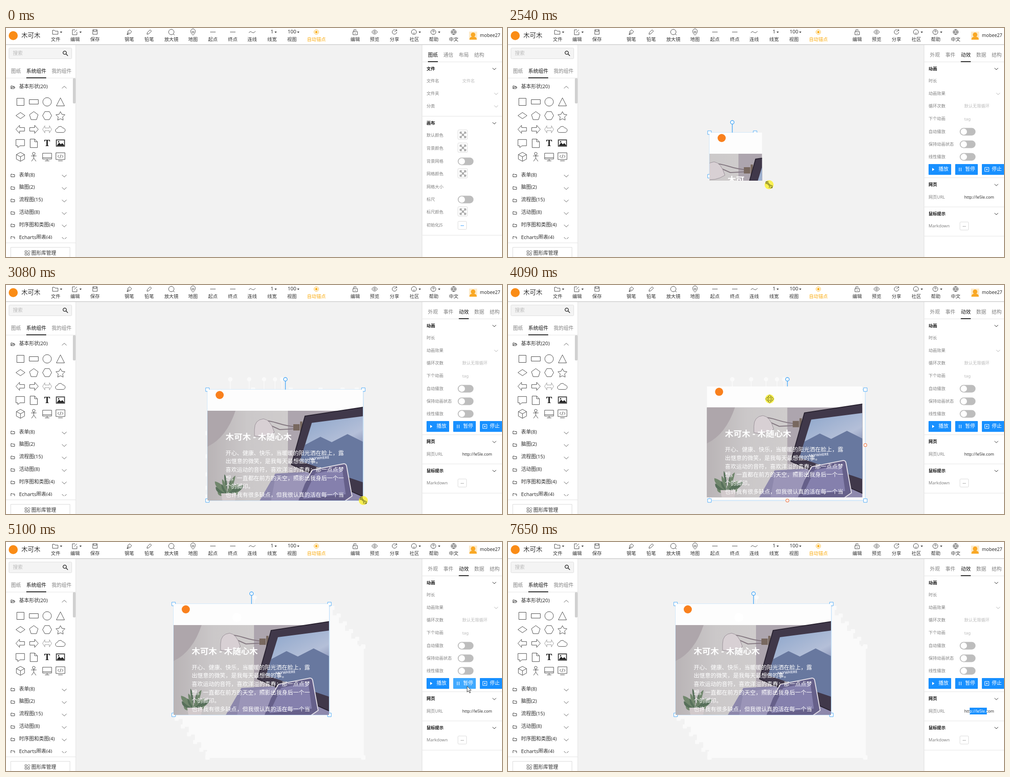
An HTML page with a canvas that plays this animation: 1098x510 px, repeating every 9460 ms.

```html
<!DOCTYPE html>
<html lang="zh-CN">
<head>
<meta charset="utf-8">
<style>
html, body { margin: 0; width: 100%; height: 100%; overflow: hidden; background: #fff; }
canvas { display: block; }
</style>
</head>
<body>
<canvas id="stage" width="1098" height="510"></canvas>
<script>
const g = document.getElementById('stage').getContext('2d');
const LOOP = 9460, FONT = '"Noto Sans","Noto Sans CJK SC",sans-serif';
const INK = '#303030', GREY = '#808080', PALE = '#bbb', BLUE = '#1890ff', GHOST = '#fafafa';

// Start, end and step count of each burst of motion.
const BURSTS = [[120, 970, 12], [1070, 1990, 13], [2090, 2310, 4], [2460, 3170, 10], [3320, 3860, 8],
  [4030, 4940, 13], [5020, 5800, 11], [6110, 6180, 2], [6480, 7120, 9], [7290, 7650, 5]];
const DROP = 1650, LOADED = 1990, GRAB = 2460, LET_GO = 3170, DRAG = 4030, DRAG_END = 4500;

// Cursor way points: time, x, y.
const PATH = [[120, 817, 486], [500, 330, 272], [970, 117, 284], [1070, 117, 284], [1530, 503, 287],
  [1700, 505, 289], [1990, 516, 304], [2090, 518, 306], [2310, 524, 320], [2460, 548, 331],
  [3170, 790, 480], [3320, 780, 468], [3860, 585, 261], [4030, 585, 261], [4485, 510, 166],
  [4940, 1020, 312], [5020, 1020, 314], [5800, 1023, 381], [6180, 1023, 381], [6480, 1028, 380],
  [7120, 1078, 377], [7290, 1075, 380], [7650, 1060, 512]];

const clamp = v => Math.max(0, Math.min(1, v));
const easeOut = v => 1 - (1 - clamp(v)) ** 2;
const gap = ([a, b, n]) => (b - a) / (n - 1);

function snap(t) {
  const b = BURSTS.filter(b => b[0] <= t).pop();
  if (!b) return 0;
  const i = Math.min(b[2] - 1, Math.floor((t - b[0]) / gap(b) + 1e-6));
  return b[0] + i * gap(b);
}

function along(t) {
  const i = PATH.findIndex(p => p[0] > t);
  if (i < 1) return PATH[i < 0 ? PATH.length - 1 : 0].slice(1);
  const [a, b] = [PATH[i - 1], PATH[i]], k = (t - a[0]) / (b[0] - a[0]);
  return [a[1] + (b[1] - a[1]) * k, a[2] + (b[2] - a[2]) * k];
}

// Box of the widget; the web page inside runs a little ahead of its outline.
function boxAt(t, growLead = 0, moveLead = 0) {
  const e = easeOut((t - 2538.9) / 418 + growLead);
  const m = t < DRAG ? 0 : clamp((t - DRAG) / 417 + moveLead);
  return { x: 446 - 75 * m, y: 233 - 95 * m, w: 101 + 244 * e, h: 97 + 150 * e };
}

function cursorAt(t) {
  if (t > GRAB && t < LET_GO) {
    const b = boxAt(t, .0657);
    return [b.x + b.w, b.y + b.h];
  }
  if (t >= DRAG && t < DRAG_END) {
    const b = boxAt(t, 0, .076);
    return [b.x + 139, b.y + 28];
  }
  return along(t);
}

function rect(x, y, w, h, fill, line, r = 0) {
  g.beginPath();
  g.roundRect(x, y, w, h, r);
  if (fill) { g.fillStyle = fill; g.fill(); }
  if (line) { g.strokeStyle = line; g.lineWidth = 1; g.stroke(); }
}
function dot(x, y, r, fill, line, width = 1) {
  g.beginPath();
  g.arc(x, y, r, 0, 7);
  if (fill) { g.fillStyle = fill; g.fill(); }
  if (line) { g.strokeStyle = line; g.lineWidth = width; g.stroke(); }
}
function icon(d, x, y, line = INK, width = 1, fill) {
  const p = new Path2D(d);
  g.save();
  g.translate(x, y);
  if (fill) { g.fillStyle = fill; g.fill(p); }
  if (line) { g.strokeStyle = line; g.lineWidth = width; g.stroke(p); }
  g.restore();
}
function text(s, x, y, size, color = INK, weight = '', align = 'left', family = FONT) {
  g.font = `${weight} ${size}px ${family}`;
  g.fillStyle = color;
  g.textAlign = align;
  g.textBaseline = 'middle';
  g.fillText(s, x, y);
}
const hline = (x, y, w, color = '#e4e4e4', h = 1) => rect(x, y, w, h, color);
const chevron = (x, y, color, s = 4, up = 1) => icon(`M${-s} ${-s / 2 * up}l${s} ${s * up} ${s} ${-s * up}`, x, y, color);
const ring = r => `M${r} 0a${r} ${r} 0 1 1 ${-2 * r} 0a${r} ${r} 0 1 1 ${2 * r} 0z`;

const FOLDER = 'M-6-4h4l2 2h6v7h-12z', LINE = 'M-6 0h12';
const EDIT = 'M1-5h-6v11h10v-6M-1 1l6-6';
const TOOLS = [
  ['文件', 110, FOLDER, 1], ['编辑', 153, EDIT, 1], ['保存', 197, 'M-5-5h10v10h-10zM-3-5v4h6v-4'],
  ['钢笔', 273, 'M-5 6l2-8 4-3 4 4-3 4zM-5 6l5-6'], ['铅笔', 317, 'M-5 5l1-4 6-6 3 3-6 6z'],
  ['放大镜', 366, ring(6) + 'M4 4l3 3'], ['地图', 414, 'M0 7c-4-4-5-6-5-9a5 5 0 0 1 10 0c0 3-1 5-5 9z' + ring(2)],
  ['起点', 458, LINE], ['终点', 502, LINE], ['连线', 545, 'M-7 2C-3-7 1 8 7-2'],
  ['线宽', 589, '1', 1], ['视图', 633, '100', 1], ['自动锚点', 687, ring(5)],
  ['编辑', 773, 'M-5-1h10v7h-10zM-3-1v-4h5v2M0 2v2'], ['预览', 816, 'M-6 0c3-6 9-6 12 0c-3 6-9 6-12 0z' + ring(2)],
  ['分享', 860, 'M1-5a5 5 0 1 0 4 5M0 0l5-5M2-5h3v3'], ['社区', 904, ring(5.5) + 'M-2 2q2 2 4 0', 1],
  ['帮助', 947, ring(5.5) + 'M-2-1q0-2 2-2t2 2q-2 1-2 2M0 3v1', 1],
  ['中文', 991, ring(5.5) + 'M-5 0h10M0-5q-5 5 0 10M0-5q5 5 0 10']];

const SHAPES = [
  'M-8-8h16v16h-16z', 'M-10-5h20v10h-20z', ring(9.5), 'M0-9l9 18h-18z',
  'M-10 0l10-7 10 7-10 7z', 'M0-9l9.5 7-3.5 11h-12l-3.5-11z', 'M-5-9h10l5 9-5 9h-10l-5-9z',
  'M0-9l3 6 7 1-5 5 1 7-6-3-6 3 1-7-5-5 7-1z',
  'M-10 0l8-9v5h11v8h-11v5z', 'M10 0l-8-9v5h-11v8h11v5z', 'M-5-8l-5 8 5 8v-5h10v5l5-8-5-8v5h-10z',
  'M-6 7a4.5 4.5 0 0 1-1-9a6.5 6.5 0 0 1 12-1a5 5 0 0 1 1 10z',
  'M-10-8h19v14h-10l-5 4v-4h-4z', 'M-8-9h10l6 6v13h-16zM2-9v6h6', '', 'M-9-7h18v14h-18z',
  'M0-10l9 5v10l-9 5-9-5v-10zM-9-5l9 5 9-5M0 0v10', 'M3-7a3 3 0 1 1-6 0a3 3 0 1 1 6 0zM-6-2h12M0-4v7l-5 7M0 3l5 7',
  'M-10-8h20v13h-20zM-10 2h20M0 5v4M-5 9h10', 'M-10-9h20v15h-20zM-5 9h10M-3-4l-3 3 3 3M3-4l3 3-3 3M1-5l-2 8'];
const GROUPS = ['表单(8)', '脑图(2)', '流程图(15)', '活动图(8)', '时序图和类图(4)', 'Echarts图表(4)'];

function toolbar() {
  rect(0, 0, 1098, 37, '#fff');
  hline(0, 36, 1098, '#d8d8d8', 2);
  dot(16, 17, 10, '#fa8c16');
  text('木可木', 34, 17, 14);
  for (const [label, x, d, caret] of TOOLS) {
    const hot = label === '自动锚点', color = hot ? '#faad14' : INK;
    text(label, x, 26.5, 10.4, color, '', 'center');
    if (/^\d/.test(d)) text(d, x, 9, 11, INK, '', 'center');
    else icon(d, x - (caret ? 1 : 0), 9, color, .9);
    if (hot) dot(x, 9, 2.6, color);
    if (caret) icon('M-2.5-1h5l-2.5 3z', x + (d === '100' ? 14 : d === '1' ? 8 : 12), 9, null, 0, INK);
  }
  rect(1025, 8, 18, 18, '#fdebcb');
  dot(1034, 15, 5, '#f9a825');
  icon('M-8 9q0-7 8-7t8 7z', 1034, 17, null, 0, '#f9a825');
  text('mobee27', 1049, 17, 10.2);
}

function sidebar(hot) {
  rect(0, 38, 154, 472, '#fff');
  rect(154, 38, 1, 472, '#e2e2e2');
  rect(6.5, 44.5, 139, 24, '#f4f4f4', '#dedede', 2);
  text('搜索', 15, 57, 11, PALE);
  icon(ring(3.7) + 'M3 3l4 4', 130, 55, '#111', 1.3);
  text('图纸', 11, 97, 11, GREY);
  text('系统组件', 45, 97, 11, '#111', '500');
  text('我的组件', 101, 97, 11, GREY);
  hline(0, 111, 154);
  hline(45, 110, 44, '#222', 2);
  rect(148, 112, 6, 56, '#d0d0d0', null, 2);
  icon('M-4 3v-6h3l1 1h3v2h-5l-2 3h7l2-3h-2', 15, 132, INK);
  text('基本形状(20)', 29, 131, 11);
  chevron(129, 132, '#555', 5, -1);
  SHAPES.forEach((d, i) => {
    const x = [32, 61.5, 91, 120.5][i % 4], y = 164.5 + 30.6 * (i >> 2);
    if (i === 14) return text('T', x, y + 1, 20, '#222', 'bold', 'center', '"Noto Serif",serif');
    icon(d, x, y, i === 19 && hot ? '#69b1ff' : i === 10 ? '#999' : '#444', i === 15 ? 2 : 1);
    if (i === 15) {
      icon('M-8 6l5-7 4 4 3-3 5 6z', x, y, null, 0, '#222');
      dot(x - 4, y - 3, 1.5, '#222');
    }
  });
  g.save();
  g.beginPath();
  g.rect(0, 310, 148, 160);
  g.clip();
  GROUPS.forEach((s, i) => {
    const y = 327.5 + 27.8 * i;
    icon('M-4-3h3l1 1h4v5h-8z', 15, y + 1, INK);
    text(s, 29, y, 11);
    chevron(129, y + 2, '#555', 5);
  });
  g.restore();
  hline(0, 478, 154);
  rect(10.5, 488.5, 131, 30, '#fff', '#d9d9d9');
  icon('M-5-5h4v4h-4zM-5 1h4v4h-4zM1 1h4v4h-4zM3.5-6l3 3-3 3-3-3z', 47, 501, '#666');
  text('图形库管理', 56, 502, 11);
}

const label = (s, y) => text(s, 931, y, 9.3, GREY);
const hint = (s, y) => text(s, 1010, y, 9.3, PALE);
function heading(s, y) {
  text(s, 931, y, 9.4, '#111', 'bold');
  chevron(1081, y, '#222');
}
function toggle(y) {
  rect(1000, y - 8.5, 35, 17, '#bdbdbd', null, 8.5);
  dot(1009, y, 7, '#fff');
}
function swatch(y) {
  rect(1000.5, y - 10.5, 21, 21, '#fff', '#d9d9d9', 2);
  rect(1004, y - 7, 15, 15, '#b4b4b4', null, 2);
  for (const [x, dy] of [[5, 0], [0, 5], [10, 5], [5, 10]]) rect(1004 + x, y - 7 + dy, 5, 5, '#fff');
  icon('M-6-6l12 12M6-6l-12 12', 1011.5, y + .5, '#aaa', 1.5);
}
function more(y, color) {
  rect(1000.5, y - 9, 19, 18, '#fff', '#d9d9d9', 2);
  for (const i of [-2.5, 0, 2.5]) rect(1009.3 + i, y, 1.5, 1.5, color);
}
function tabs(names, active) {
  rect(921, 38, 177, 472, '#fff');
  rect(920.5, 38, 1, 472, '#dcdcdc');
  hline(922, 75, 176);
  names.forEach((s, i) => {
    const on = i === active, x = 934 + 34.2 * i;
    text(s, x, 60.5, 11, on ? '#111' : GREY, on ? '500' : '');
    if (on) hline(x, 74, 22, '#222', 2);
  });
}

function drawingPanel() {
  tabs(['图纸', '通信', '布局', '结构'], 0);
  heading('文件', 91);
  label('文件名', 118.5);
  hint('文件名', 118.5);
  [['文件夹', 146.5], ['分类', 174.5]].forEach(([s, y]) => { label(s, y); chevron(1085, y, '#aaa'); });
  hline(922, 196, 176);
  heading('画布', 212);
  [['默认颜色', 239, swatch], ['背景颜色', 268, swatch], ['背景网格', 297, toggle], ['网格颜色', 325, swatch],
    ['网格大小', 354], ['标尺', 382, toggle], ['标尺颜色', 410, swatch]].forEach(([s, y, draw]) => {
    label(s, y);
    if (draw) draw(draw === swatch ? y - 1.5 : y);
  });
  label('初始化JS', 439.5);
  more(439.5, BLUE);
  hline(922, 461, 176);
}

function effectPanel(t, [cx, cy]) {
  tabs(['外观', '事件', '动效', '数据', '结构'], 2);
  heading('动画', 91);
  ['时长', '动画效果', '循环次数', '下个动画', '自动播放', '保持动画状态', '线性播放'].forEach((s, i) => {
    const y = 118.5 + 28.1 * i;
    label(s, y);
    if (i === 1) chevron(1085, y, '#aaa');
    if (i > 3) toggle(y);
  });
  hint('默认无限循环', 174.7);
  hint('tag', 203);
  ['播放', '暂停', '停止'].forEach((s, i) => {
    const x = 931 + 59 * i, over = cx >= x && cx < x + 50 && cy >= 303 && cy < 327 && t > DRAG;
    rect(x, 303, 50, 24, over ? '#40a9ff' : BLUE, null, 1);
    if (i === 0) icon('M-2-3.5l5 3.5-5 3.5z', x + 10, 315, null, 0, '#fff');
    if (i === 1) icon('M-2-4v8M2-4v8', x + 11, 315, '#fff', 1.2);
    if (i === 2) icon('M-4.5-4.5h9v9h-9zM-2-2l4 4M2-2l-4 4', x + 11, 315, '#fff');
    text(s, x + 22, 315, 11, '#fff');
  });
  hline(922, 333, 176);
  heading('网页', 349.5);
  label('网页URL', 377);
  if (t >= 5640 && t < 7110) rect(1000.5, 365.5, 110, 21, '#fff', '#40a9ff', 2);
  const url = 'http://le5le.com';
  text(url, 1010, 377, 8.85, INK);
  if (t >= 6480) {
    const end = Math.min(1076, cx);
    g.save();
    g.beginPath();
    g.rect(1022, 369, Math.max(0, end - 1022), 15);
    g.clip();
    rect(1022, 369, 54, 15, BLUE);
    text(url, 1010, 377, 8.85, '#fff');
    g.restore();
  }
  hline(922, 398, 176);
  heading('鼠标提示', 414);
  label('Markdown', 441);
  more(441, '#999');
  hline(922, 463, 176);
}

function photo() {
  rect(-120, 0, 600, 210, '#ada5ae');
  const wall = g.createLinearGradient(0, 0, 178, 0);
  wall.addColorStop(0, '#b9b4b6');
  wall.addColorStop(.5, '#cbc8c9');
  wall.addColorStop(1, '#cfcccc');
  rect(0, 0, 178, 210, wall);
  icon('M0 0h62q-20 60-62 80z', 0, 0, null, 0, '#aea6ab');
  icon('M150 140L345 130V210H110z', 0, 0, null, 0, '#8d88ac');
  icon('M126 22C150 22 160 34 198 36M120 24L160 42 198 40', 0, 0, '#82767f', 2);
  icon('M205 24h5v28h-5z' + 'M190 30h14v14h-14z', 0, 0, null, 0, '#78685f');
  icon('M104 42Q104 20 124 18Q140 20 148 48Q126 62 104 56z', 0, 0, '#988f97', 1, '#d8d0d4');
  icon('M216 12L346-8V192L186 120z', 0, 0, '#292331', 2, '#40384a');
  const sky = g.createLinearGradient(230, 15, 300, 150);
  sky.addColorStop(0, '#90a8cc');
  sky.addColorStop(.5, '#b4bfd8');
  sky.addColorStop(1, '#5a6495');
  icon('M231 27L346 12V160L205 112z', 0, 0, null, 0, sky);
  icon('M216 76L250 58 275 70 310 52 346 70V160L205 112z', 0, 0, null, 0, '#68789f');
  g.save();
  g.translate(247, 106);
  g.rotate(-.08);
  text('ANYWHERE', 0, 0, 8, '#dfe3f0', 'bold', 'center');
  g.restore();
  icon('M232 132L302 118Q307 118 308 124L320 190 300 204H190z', 0, 0, '#e3dfe8', 2, '#66608a');
  icon('M238 140L298 127 306 186 212 196z', 0, 0, null, 0, '#8580ad');
  icon('M150 150L225 138 200 204H140z', 0, 0, null, 0, '#9b95b8');
  for (let i = 0; i < 13; i++) {
    const a = -2.9 + i * .22, r = 24 + 7 * (i % 3);
    const x = 46 + Math.cos(a) * r, y = 186 + Math.sin(a) * r * 1.2;
    icon(`M44 188Q${46 + Math.cos(a) * 9} ${y + 6} ${x} ${y}Q${x - 2} ${y + 16} 48 188z`, 0, 0, null, 0, i % 2 ? '#57705a' : '#71876d');
  }
  icon('M30 184h34l-4 22h-26z', 0, 0, null, 0, '#d2cacc');
}

const TITLE = '木可木 - 木随心木';
const STORY = ['开心、健康、快乐，当暖暖的阳光洒在脸上，露出惬意的微笑，是我每天最想做的事。',
  '喜欢运动的音符，喜欢洋溢的青春；那一点点梦想，一直都在前方的天空，照影出我身后一个一个的脚印。',
  '也许我有很多缺点，但我很认真的活在每一个当下。'];

function wrap(s, x, y, width, size, leading, weight) {
  let row = '';
  for (const c of s) {
    g.font = `${weight} ${size}px ${FONT}`;
    if (row && g.measureText(row + c).width > width) {
      text(row, x, y, size, '#fff', weight);
      row = '';
      y += leading;
    }
    row += c;
  }
  text(row, x, y, size, '#fff', weight);
  return y + leading;
}

function webPage({ x, y, w, h }, loaded) {
  g.save();
  g.beginPath();
  g.rect(x, y, w - 1, h);
  g.clip();
  rect(x, y, w, h, '#fdfdfd');
  if (loaded) {
    dot(x + 27, y + 12, 9, '#f9801d');
    g.save();
    g.translate(x + (w - 345) / 2, y + 47);
    photo();
    g.restore();
    let ty = wrap(TITLE, x + 40, y + 107, w - 79, 18.7, 28, 'bold') + 7;
    for (const s of STORY) ty = wrap(s, x + 40, ty, w - 81, 12.47, 18.7, '');
  }
  g.restore();
}

function outline({ x, y, w, h }, ghost, anchors) {
  const line = ghost ? GHOST : '#46a6f5', fill = ghost ? GHOST : '#fff';
  rect(x, y, w, h, ghost && GHOST, ghost ? GHOST : '#a9d6fb');
  icon('M0 0v-19', x + w / 2, y, line, 1.5);
  dot(x + w / 2, y - 23, 4, fill, line, 1.5);
  for (const cx of [x, x + w]) for (const cy of [y, y + h]) rect(cx - 4, cy - 4, 8, 8, fill, line);
  if (anchors) for (const [ax, ay] of [[0, .5], [1, .5], [.5, 0], [.5, 1]])
    dot(x + w * ax, y + h * ay, 3.3, '#fff', '#ee7f50', 1.3);
}

function trail(t) {
  for (const b of [BURSTS[3], BURSTS[5]])
    for (let i = 0; i < b[2]; i++) {
      const s = b[0] + i * gap(b);
      if (s < t - 1) outline(boxAt(s), true);
    }
}

function pointer(t, [x, y]) {
  const down = t >= GRAB && t < LET_GO || t >= DRAG && t < DRAG_END || t >= 6110 && t < 7110;
  if (down) dot(x, y, 10, 'rgba(250,240,60,.88)');
  if (t >= GRAB && t < 3320) icon('M-7-2v-5h5M7 2v5h-5M-7-7L7 7M-7-2l2-1 6 6-1 4M-2-7l-1 2 6 6 4 1', x, y, '#55551a');
  else if (t >= 3860 && t < DRAG_END)
    icon('M0-9l4 4h-2.5v3.5h3.5v-2.5l4 4-4 4v-2.5h-3.5v3.5h2.5l-4 4-4-4h2.5v-3.5h-3.5v2.5l-4-4 4-4v2.5h3.5v-3.5h-2.5z', x, y, '#66661c');
  else if (t >= 5600 && t < 7110) icon('M-3-7h2.5l.5 1 .5-1h2.5M0-6v12M-3 7h2.5l.5-1 .5 1h2.5', x, y, '#222', 1.3);
  else icon('M.5.5v13l3-3 2.5 5 2-1-2.5-5h4z', x, y, '#333', 1, '#fff');
}

function draw(now) {
  const t = snap(now % LOOP), cursor = cursorAt(t), dropped = t >= DROP;
  rect(0, 0, 1098, 510, '#f2f2f2');
  if (dropped) {
    trail(t);
    outline(boxAt(t), false, t >= 3860 && t < DRAG_END);
    webPage(boxAt(t, .034, .076), t >= LOADED);
    if (t >= DRAG_END) dot(511, 168, 10, '#fff');
  }
  sidebar(t >= 890 && !dropped);
  if (dropped) effectPanel(t, cursor);
  else drawingPanel();
  toolbar();
  if (t >= 120 && t < 7649) pointer(t, cursor);
}

let begin;
function frame(now) {
  begin ??= now;
  draw(now - begin);
  requestAnimationFrame(frame);
}
requestAnimationFrame(frame);
</script>
</body>
</html>
```
